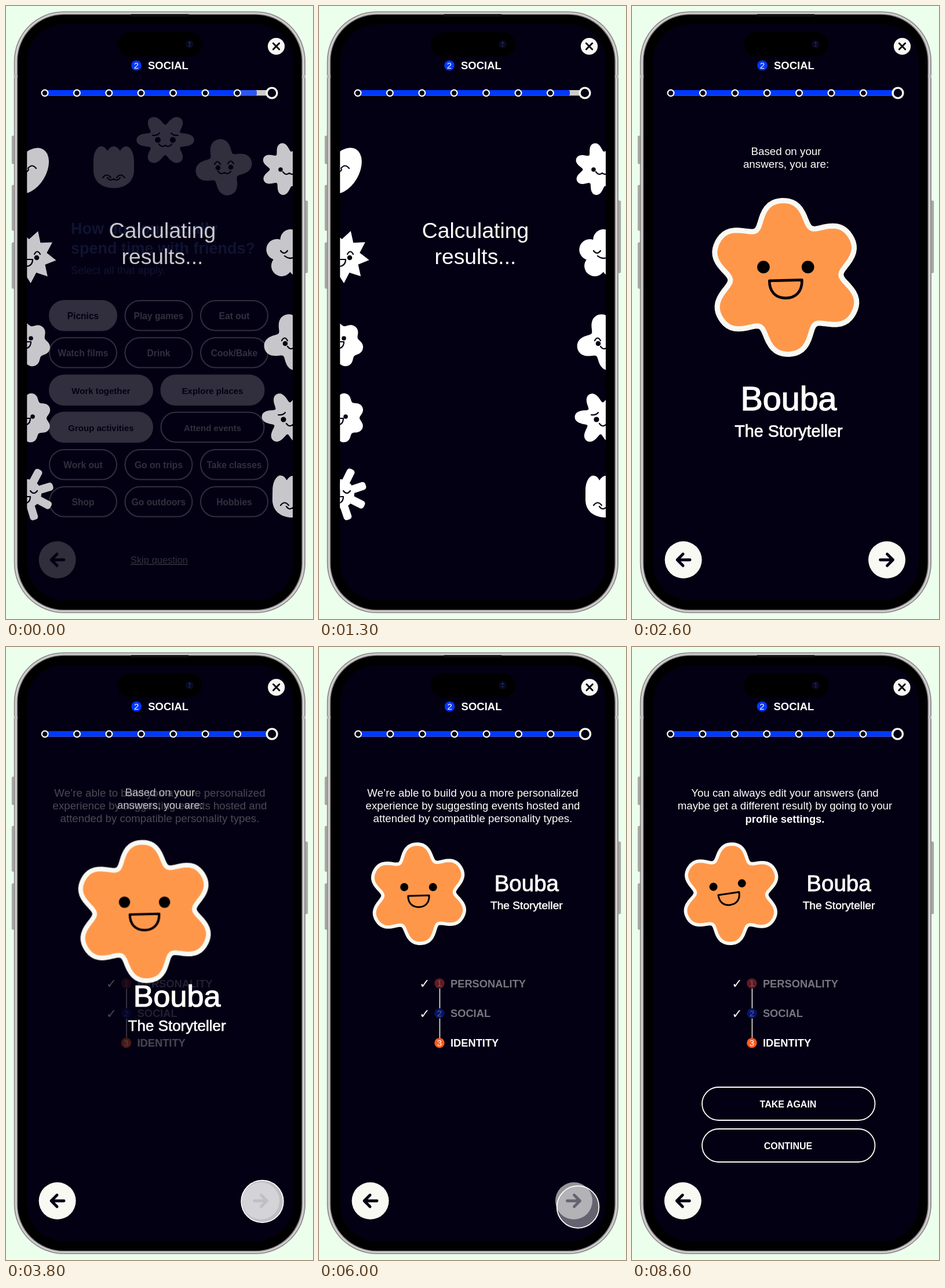
Animation of 530x1057 px, one loop 8700 ms. Source, as an HTML page:

```html
<!DOCTYPE html>
<html lang="en">
<head>
<meta charset="utf-8">
<title>Quiz result</title>
<style>
html, body { margin: 0; width: 100%; height: 100%; overflow: hidden; background: #ecffec; }
svg { display: block; width: 100vw; height: 100vh; font-family: "Liberation Sans", Arial, sans-serif; }
.line { fill: none; stroke: #050013; stroke-width: 2.2; stroke-linecap: round; stroke-linejoin: round; }
</style>
</head>
<body>
<svg id="stage" viewBox="0 0 530 1057"></svg>
<script>
const INK = '#040013', CREAM = '#f9f9f3', BLUE = '#0038ff';

// --- markup helpers ---
const text = (x, y, size, str, more = '') =>
  `<text x="${x}" y="${y}" font-size="${size}" fill="#fff" ${more}>${str}</text>`;
const MID = 'text-anchor="middle"', BOLD = 'font-weight="700"';
const circle = (x, y, r, fill, more = '') =>
  `<circle cx="${x}" cy="${y}" r="${r}" fill="${fill}" ${more}/>`;
const rect = (x, y, w, h, r, fill, more = '') =>
  `<rect x="${x}" y="${y}" width="${w}" height="${h}" rx="${r}" fill="${fill}" ${more}/>`;
const line = d => `<path class="line" d="${d}"/>`;
const group = (id, body, more = '') => `<g id="${id}" ${more}>${body}</g>`;
const at = (x, y, body) => `<g transform="translate(${x} ${y})">${body}</g>`;

// closed outline in polar form, angle measured from the top
function ring(radius, steps = 144) {
  let d = '';
  for (let i = 0; i < steps; i++) {
    const a = i / steps * 2 * Math.PI, r = radius(a, i);
    d += (i ? 'L' : 'M') + (r * Math.sin(a)).toFixed(2) + ' ' + (-r * Math.cos(a)).toFixed(2);
  }
  return d + 'Z';
}
// n lobes between r - amp and r + amp; the second harmonic rounds the tips
const lobes = (n, r, amp, flat = .13) =>
  ring(a => r + amp * (Math.cos(n * a) + flat * (1 - Math.cos(2 * n * a))));
const wavy = (...args) => `<path d="${lobes(...args)}"/>`;
const petals = (n, body) =>
  Array.from({ length: n }, (_, i) => `<g transform="rotate(${i * 360 / n})">${body}</g>`).join('');

// --- small characters ---
const shape = {
  oval: '<ellipse rx="27" ry="43"/>',
  spiky: `<path d="${ring((a, i) => i % 2 ? 30 : 46, 18)}"/>`,
  pond: wavy(6, 35.5, 4),
  daisy: wavy(7, 38.5, 4.5),
  sun: petals(8, rect(-7, -47, 14, 40, 5, '#fff')) + '<circle r="25"/>',
  splat: wavy(7, 38, 7.5),
  clover: petals(5, '<circle cy="-25" r="18"/>') + '<circle r="20"/>',
  star: wavy(4, 38.5, 10.5),
  flower: wavy(6, 37, 9.5),
  tulip: '<path d="M-35-10C-35-28-27-36-22-36Q-15-36-11-28Q-6-36 0-36Q6-36 11-28Q15-36 22-36C27-36 35-28 35-10V5C35 25 20 36 0 36S-35 25-35 5Z"/>'
};
const dot = (x, y, r = 4.3) => circle(x, y, r, '#050013');
const arch = (x, y, w = 7) => line(`M${x - w} ${y + 3}Q${x} ${y - 6} ${x + w} ${y + 3}`);
const cup = (x, y, w = 7) => line(`M${x - w} ${y - 3}Q${x} ${y + 5} ${x + w} ${y - 3}`);
const omega = (x, y) => line(`M${x - 11} ${y - 2}Q${x - 6} ${y + 5} ${x} ${y}Q${x + 6} ${y + 5} ${x + 11} ${y - 2}`);
const grin = (x, y) => line(`M${x - 12} ${y - 4}H${x + 5}Q${x + 5} ${y + 7} ${x - 6} ${y + 8}`);

// x, y, mean turn, swing, shape, face
const cast = [
  [42, 284, 24, 7, 'oval', arch(3, -7) + cup(-7, 1, 4)],
  [41, 432, 14, 4, 'spiky', dot(12, 2) + arch(13, -7, 5) + grin(0, 9)],
  [37, 583, 36, 6, 'pond', dot(6, -10, 3.8) + grin(1, 0)],
  [36, 710, 9, 5, 'daisy', dot(10, -2, 3.8) + grin(1, 5)],
  [36, 841, 16, 12, 'sun', cup(12, -2, 6) + grin(1, 9)],
  [486, 281, -19, 5, 'splat', dot(-12, 1, 3.8) + omega(3, 7)],
  [491, 428, -3, 4, 'clover', cup(-11, -3, 6) + cup(0, 6, 10)],
  [494, 580, -16, 5, 'star', dot(-12, 2) + arch(-13, -6, 5) + omega(3, 9)],
  [488, 711, -29, 3, 'flower', dot(-9, 2, 4.6) + line('M-18-6Q-10-5-6-10') + omega(7, 11)],
  [495, 846, -4, 5, 'tulip', arch(-14, 12) + omega(0, 19)]
];
const castMarkup = cast.map(([x, y, , , kind, face]) =>
  at(x, y, `<g class="body" fill="#fff">${shape[kind]}</g>${face}`)).join('');

// --- question screen ---
const rows = [
  [508, 15.6, ['*Picnics', 'Play games', 'Eat out']],
  [572, 15.6, ['Watch films', 'Drink', 'Cook/Bake']],
  [636.5, 15, ['*Work together', '*Explore places']],
  [700.5, 15, ['*Group activities', 'Attend events']],
  [765, 15.6, ['Work out', 'Go on trips', 'Take classes']],
  [829, 15.6, ['Shop', 'Go outdoors', 'Hobbies']]
];
const pills = rows.map(([y, size, labels]) => labels.map((label, i) => {
  const wide = labels.length === 2, w = wide ? 178 : 116, x = 75 + i * (wide ? 192.5 : 130.5);
  const on = label[0] === '*';
  return rect(x, y, w, 51.5, 25.7, on ? '#fff' : 'none', 'stroke="#fff" stroke-width="2"') +
    `<text x="${x + w / 2}" y="${y + 32}" font-size="${size}" ${MID} ${BOLD} fill="${on ? INK : '#fff'}">${label.replace('*', '')}</text>`;
}).join('')).join('');
const trio =
  at(186, 278, `<g fill="#fff">${shape.tulip}</g>` + arch(-12, 15) + arch(12, 15) + omega(0, 20)) +
  at(275, 231, `<g fill="#fff" transform="scale(1.07 .95) rotate(30)">${shape.flower}</g>` +
    dot(-13, 0, 5) + dot(13, 0, 5) + line('M-22-8Q-14-7-10-12M22-8Q14-7 10-12') + omega(0, 9)) +
  at(376, 278, `<g fill="#fff" transform="rotate(-11)">${shape.star}</g>` +
    dot(-10, 1) + dot(12, 0) + arch(-11, -8, 5) + arch(12, -9, 5) + omega(1, 9));
const tint = s => s.replace('fill="#fff"', 'fill="#4468c4"');
const question = trio +
  tint(text(112, 393, 27, 'How do you usually', BOLD)) +
  tint(text(112, 427, 27, 'spend time with friends?', BOLD)) +
  tint(text(112, 462, 18.4, 'Select all that apply.')) + pills +
  text(264.5, 961, 16.5, 'Skip question', MID + ' text-decoration="underline"');

// --- shared parts ---
const stops = Array.from({ length: 7 }, (_, i) =>
  circle(67 + i * 55.4, 150, 5.4, INK, 'stroke="#fff" stroke-width="2.2"')).join('');
const header =
  circle(225, 102.5, 8.8, BLUE) + text(225, 108, 15, '2', MID) +
  text(245, 109, 18.5, 'SOCIAL', BOLD) +
  rect(67, 145, 392, 9.5, 0, '#cfcbc9') + rect(67, 145, 332, 9.5, 0, BLUE) +
  `<rect id="bar" x="399" y="145" height="9.5" rx="3" fill="${BLUE}"/>` + stops +
  circle(459, 150, 8.9, INK, 'stroke="#f9f9f3" stroke-width="3.4"') +
  circle(466.5, 69.5, 14.6, CREAM) +
  `<path d="M461.3 64.3l10.4 10.4m0-10.4l-10.4 10.4" stroke="${INK}" stroke-width="2.9" stroke-linecap="round"/>`;
const arrow = circle(0, 0, 32, CREAM) +
  '<path d="M-10.5 0H11.5M-.5-10L-10.5 0L-.5 10" fill="none" stroke="#050013" stroke-width="4.8" stroke-linecap="round" stroke-linejoin="round"/>';

const blob =
  `<path id="skin" d="${lobes(6, 83.25, 13.5, .17)}" fill="#ff974b" stroke="${CREAM}" stroke-width="6.6" stroke-linejoin="round"/>` +
  group('face',
    '<ellipse class="eye"/><ellipse class="eye"/>' +
    '<path d="M-20.5 4.2L20.5 3.2C21 18.500 12 26 0 26C-13 26-20.5 17.500-20.5 4.2Z" fill="none" stroke="#050005" stroke-width="3.4" stroke-linejoin="round"/>');
const label = text(0, 0, 38.5, 'Bouba', MID + ' stroke="#fff" stroke-width=".9"') +
  text(0, 31, 19.2, 'The Storyteller', MID + ' stroke="#fff" stroke-width=".5"');

const step = (y, n, color, name, dim) =>
  `<g opacity="${dim ? .38 : 1}">${circle(207.5, y, 8.7, color)}${text(207.5, y + 5.3, 15, n, MID)}</g>` +
  `<g opacity="${dim ? .46 : 1}">${text(226.5, y + 6.5, 18.3, name, BOLD)}</g>` +
  (dim ? text(182, y + 8, 22, '✓', MID + ' font-family="DejaVu Sans, sans-serif"') : '');
const list =
  '<path d="M208 589V623M208 640.5V674" stroke="#fff" stroke-width="1.4"/>' +
  step(580, 1, '#ff4438', 'PERSONALITY', true) +
  step(631.7, 2, BLUE, 'SOCIAL', true) +
  step(682.7, 3, '#ff5a1c', 'IDENTITY', false);

const button = (y, name) =>
  rect(121, y, 298.5, 57, 28.5, 'none', 'stroke="#fff" stroke-width="1.8"') +
  text(269.5, y + 34.6, 16, name, MID + ' ' + BOLD);

// --- phone ---
const side = (x, y, h) => rect(x, y, 5, h, 1.5, '#a9a9a9', 'stroke="#858585" stroke-width=".6"');
const shell =
  side(10.3, 224, 48) + side(10.3, 309, 78) + side(10.3, 408, 79) + side(515.7, 336, 124) +
  rect(13.7, 9.2, 503.3, 1037.6, 86, '#8e8c8c') +
  rect(15.6, 11, 499.5, 1034, 84, '#d4d1d1') +
  rect(18.6, 13.5, 493.5, 1029, 81, '#8a8888') +
  rect(20, 15, 490.5, 1026, 80, '#000') +
  rect(14, 119, 6, 5, 0, '#bcbaba') + rect(511, 119, 6, 5, 0, '#bcbaba') +
  rect(215, 14, 101, 4, 2, '#111') +
  rect(36.5, 31.5, 459, 993, 63, INK);
const island = rect(193, 45, 145.5, 42.5, 21.2, '#000') +
  circle(317, 66, 7, '#09091c') + circle(317, 63.5, 2, '#1b2266') + circle(317, 68.5, 1.8, '#171d58');

document.getElementById('stage').innerHTML =
  `<clipPath id="screen">${rect(36.3, 31.5, 458.7, 993, 63, '#000')}</clipPath>` + shell +
  `<g clip-path="url(#screen)">` +
  group('question', question) +
  group('calc', castMarkup + text(270, 400, 37.3, 'Calculating', MID) + text(270, 444.5, 37.3, 'results...', MID)) +
  group('based', text(266, 257, 18.8, 'Based on your', MID) + text(266, 279, 18.8, 'answers, you are:', MID)) +
  group('able', text(265.5, 258, 18.7, 'We’re able to build you a more personalized', MID) +
    text(265.5, 280, 18.7, 'experience by suggesting events hosted and', MID) +
    text(265.5, 302, 18.7, 'attended by compatible personality types.', MID)) +
  group('edit', text(264, 258, 18.7, 'You can always edit your answers (and', MID) +
    text(264, 280, 18.7, 'maybe get a different result) by going to your', MID) +
    text(264, 303, 18.4, 'profile settings.', MID + ' ' + BOLD) +
    button(759, 'TAKE AGAIN') + button(831, 'CONTINUE')) +
  group('list', list) + group('label', label) + group('blob', blob) +
  group('back', arrow) + group('next', `<g transform="scale(-1 1)">${arrow}</g>`) +
  '</g>' + island + group('header', header) +
  `<g id="touch"><circle r="36.3" fill="#d2d2d6"/><circle r="36.3" fill="none" stroke="#fff" stroke-width="1.8"/></g>`;

// --- motion ---
const ui = Object.fromEntries([...document.querySelectorAll('g[id], #bar, #skin')].map(n => [n.id, n]));
const bodies = [...document.querySelectorAll('.body')];
const eyes = [...document.querySelectorAll('.eye')];
const touchFill = ui.touch.firstChild;
const LOOP = 8700;

const clamp = v => Math.max(0, Math.min(1, v));
const mix = (a, b, p) => a + (b - a) * p;
const fade = (t, start) => 1 - (1 - clamp((t - start) / 500)) ** 3;
const show = (node, v) => {
  node.setAttribute('opacity', v.toFixed(3));
  node.style.display = v > .002 ? '' : 'none';
};
const move = (node, x, y, s = 1) => node.setAttribute('transform', `translate(${x} ${y}) scale(${s})`);

// time, x, y, press, visibility
const touchKeys = [
  [2800, 467, 968, .47, 0], [3000, 467, 968, .47, 1], [3300, 442.5, 956, .47, 1],
  [3600, 442.5, 956, .93, 1], [4900, 442.5, 956, .83, 1], [5800, 447, 964.5, .47, 1],
  [6000, 447, 965.5, .47, 1], [6300, 467, 968, .47, 1], [6700, 467, 968, .47, 0]
];
function sample(keys, t) {
  if (t <= keys[0][0]) return keys[0];
  for (let i = 1; i < keys.length; i++) {
    const a = keys[i - 1], b = keys[i];
    if (t < b[0]) return a.map((v, k) => mix(v, b[k], (t - a[0]) / (b[0] - a[0])));
  }
  return keys[keys.length - 1];
}

function draw(t) {
  const calc = fade(t, -200), result = fade(t, 1392), plan = fade(t, 3748), end = fade(t, 6050);
  const shift = mix(mix(0, .6, plan), -.5, end);

  show(ui.question, (1 - calc) * .85);
  show(ui.calc, calc * (1 - result));
  show(ui.based, result * (1 - plan));
  show(ui.able, plan * (1 - end));
  show(ui.edit, end);
  show(ui.list, plan);
  show(ui.bar, calc);
  ui.bar.setAttribute('width', mix(34, 60, result));
  move(ui.header, shift, 0);
  move(ui.list, shift - .1, 0);

  const swing = Math.cos(t / 1200 * 2 * Math.PI);
  bodies.forEach((b, i) => b.setAttribute('transform', `rotate(${cast[i][2] + cast[i][3] * swing})`));

  const y = mix(mix(1063, 468, result), 425.5, plan);
  const size = mix(mix(1.045, 1.37, result), .885, plan);
  show(ui.blob, result);
  move(ui.blob, mix(265.3, 172, plan) - end, y, size);
  show(ui.label, result);
  move(ui.label, mix(270.5, 358.3, plan) - 1.3 * end, mix(697, 421, plan), mix(1.493, 1, plan));

  const tilt = t < 6600 ? 0 : .5 - .5 * Math.cos((t - 6600) / 800 * 2 * Math.PI);
  ui.skin.setAttribute('transform', `rotate(${mix(-2.6, 1.4, tilt)})`);
  ui.face.setAttribute('transform', `translate(${-5 * tilt} ${-4 * tilt}) rotate(${-7 * tilt})`);
  const blink = t >= 1500 && t < 1800;
  eyes.forEach((e, i) => {
    e.setAttribute('cx', (i ? 1 : -1) * (blink ? 25.7 : 28));
    e.setAttribute('cy', blink ? -10 : -13);
    e.setAttribute('rx', blink ? 10.7 : 7.9);
    e.setAttribute('ry', blink ? 2 : 7.9);
  });

  show(ui.back, Math.max((1 - calc) * .85, result));
  move(ui.back, 88.6 - .8 * end, 955);
  show(ui.next, result * mix(1, .6, clamp((t - 5800) / 200)) * (1 - end));
  move(ui.next, 440, 955);

  const [, x, ty, press, seen] = sample(touchKeys, t);
  show(ui.touch, seen);
  move(ui.touch, x, ty);
  touchFill.setAttribute('opacity', press);
}

const begin = performance.now();
function tick(now) {
  const t = Math.max(0, now - begin) % LOOP;
  draw(Math.floor(t / 100) * 100);
  requestAnimationFrame(tick);
}
draw(0);
requestAnimationFrame(tick);
</script>
</body>
</html>
```
